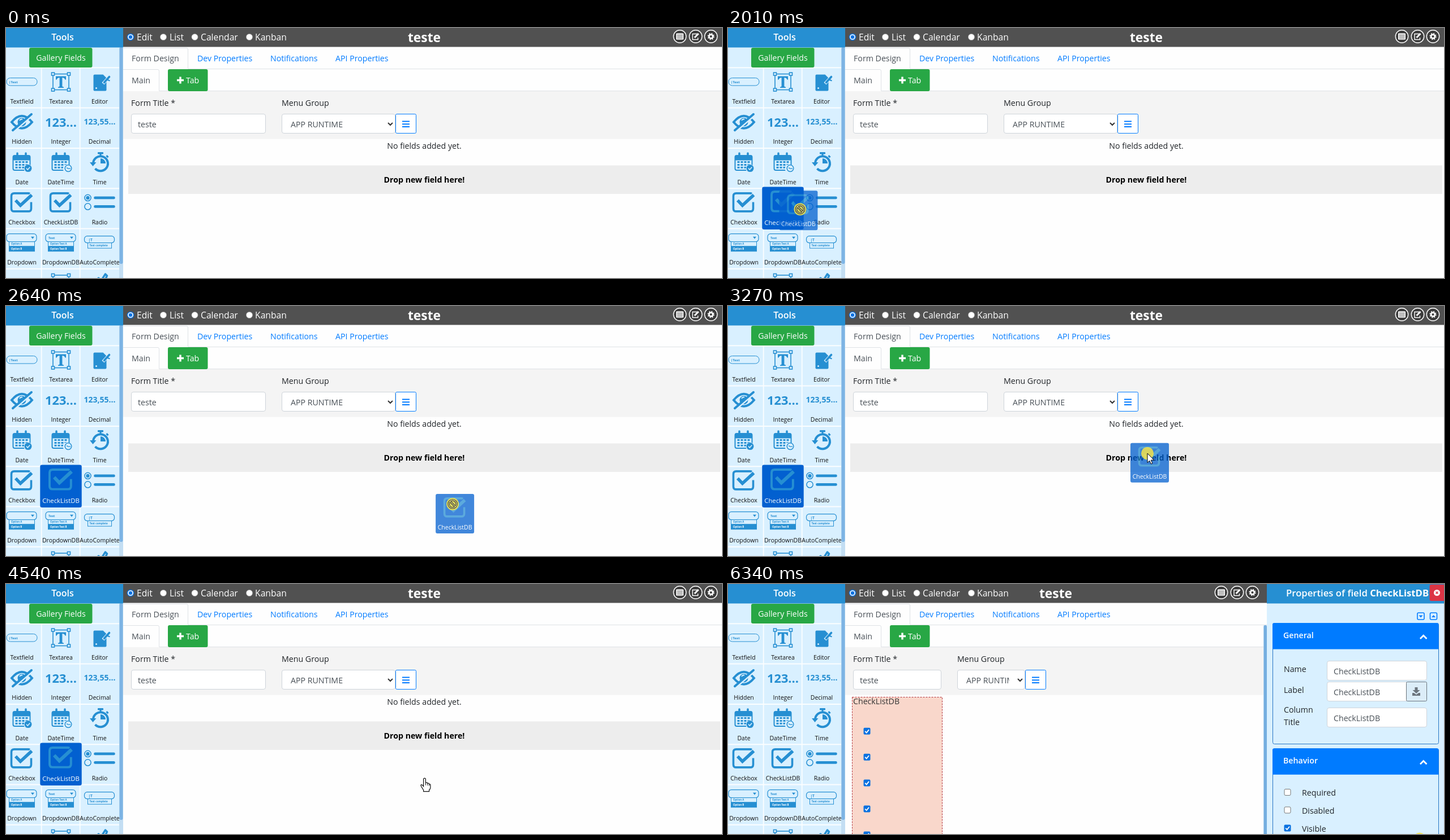
Animation, 1265 px wide and 443 px high, one loop 6.48 s. Source, as an HTML page:

```html
<!DOCTYPE html>
<html lang="en">
<head>
<meta charset="utf-8">
<title>Form designer</title>
<style>
html, body { margin: 0; width: 100%; height: 100%; overflow: hidden; background: #fefefe; }
svg { display: block; }
text { font-family: "Open Sans", "Noto Sans", sans-serif; font-size: 14.2px; fill: #212529; white-space: pre; }
</style>
</head>
<body>
<svg id="stage" width="1265" height="443" viewBox="0 0 1265 443"></svg>
<script>
const LOOP = 6480, BLUE = '#268fd2', LINK = '#007bff', GREEN = '#28a745', PALE = '#d9f0ff', GREY = '#495057';

const text = (x, y, s, fill = '#212529', size = 14.2, more = '') =>
  `<text x="${x}" y="${y}" style="fill:${fill};font-size:${size}px" ${more}>${s}</text>`;
const rect = (x, y, w, h, fill, r = 0, more = '') =>
  `<rect x="${x}" y="${y}" width="${w}" height="${h}" rx="${r}" fill="${fill}" ${more}/>`;
const line = (d, color, w = 1, more = '') =>
  `<path d="${d}" fill="none" stroke="${color}" stroke-width="${w}" ${more}/>`;
const shape = (d, fill, more = '') => `<path d="${d}" fill="${fill}" ${more}/>`;
const dot = (x, y, r, fill, more = '') => `<circle cx="${x}" cy="${y}" r="${r}" fill="${fill}" ${more}/>`;
const group = (x, y, s) => `<g transform="translate(${x} ${y})">${s}</g>`;
const ring = (c, w = 1) => `stroke="${c}" stroke-width="${w}" `;
const MID = 'text-anchor="middle" ', SEMI = 'font-weight="600" ', BOLD = 'font-weight="700" ';
const ROUND = 'stroke-linecap="round" stroke-linejoin="round"';

// Tool icons, drawn around their own centre
const frame = rect(-14, -14, 28, 28, 'none', 0, ring(BLUE, 1.6)) +
  [[-14, -14], [14, -14], [-14, 14], [14, 14]].map(([x, y]) => rect(x - 2.5, y - 2.5, 5, 5, PALE, 0, ring(BLUE, 1.6))).join('');
const calendar = (badge) =>
  rect(-15.5, -12, 30, 26, PALE, 3, ring(BLUE, 2)) + rect(-16, -12.5, 31, 9, BLUE, 2) +
  line('M-8 -16v7M7 -16v7', BLUE, 3.5, ROUND) +
  [0, 1, 2].map(r => line(`M-11.5 ${-0.5 + r * 4.8}H11`, BLUE, 3, 'stroke-dasharray="4 2"')).join('') +
  dot(11, 11, 7.5, PALE) + badge;
const tick = line('M16.5 -1V10.5Q16.5 15.5 11.5 15.5H-13.5Q-18.5 15.5 -18.5 10.5V-11.5Q-18.5 -16.5 -13.5 -16.5H11.5Q13 -16.5 14 -15.8', BLUE, 3.6) +
  line('M-11 -4L-2.5 5L17.5 -13.5', BLUE, 5.6);
const dropdown = (head, a, b) =>
  rect(-27, -16, 53, 14, 'none', 5, ring(BLUE, 1.2)) + shape('M16 -11h6l-3 4z', BLUE) + text(-22, -7, head, BLUE, 5.5, BOLD) +
  rect(-22.5, -2, 45, 17, PALE, 0, ring(BLUE)) + rect(-22.5, 5.5, 45, 9.5, BLUE) +
  text(-19, 3.7, a, BLUE, 4.4, BOLD) + text(-19, 12, b, '#fff', 4.4, BOLD);

const TOOLS = [
  ['Textfield', rect(-27, -7, 54, 13.5, 'none', 6.5, ring(BLUE)) + text(-23, 2, '|Text', BLUE, 6, BOLD)],
  ['Textarea', frame + shape('M-9 -10H9V-4H7.4Q6.5 -7.5 2.4 -7.5V7.5Q2.6 9 5 9V10.5H-5V9Q-2.6 9 -2.4 7.5V-7.5Q-6.5 -7.5 -7.4 -4H-9Z', BLUE)],
  ['Editor', shape('M-9 -13H6L12 -7V14Q12 16 10 16H-9Q-11 16 -11 14V-11Q-11 -13 -9 -13Z', BLUE) +
    line('M6 3L16 -8', PALE, 5.5) + line('M8 1L17 -9', BLUE, 3.6, ROUND) + line('M13 -4l5 2', BLUE, 2) + dot(-6, 11, 1.5, PALE)],
  ['Hidden', line('M-18 0Q0 -22 18 0Q0 22 -18 0Z', BLUE, 4) + dot(0, 0, 7.5, BLUE) + line('M-4 -3q2 -3 5 -2', PALE, 2) +
    line('M-14 16.5L19 -12', PALE, 3) + line('M-16 14.5L17 -14', BLUE, 4, ROUND)],
  ['Integer', text(0, 8, '123...', BLUE, 21.8, BOLD + MID)],
  ['Decimal', text(0, 4.5, '123,55...', BLUE, 14, BOLD + MID)],
  ['Date', calendar(dot(11, 10.5, 6.5, BLUE) + line('M8 10.5l2.3 2.5 4 -4.5', PALE, 1.5))],
  ['DateTime', calendar(dot(13, 10.5, 5.8, PALE, ring(BLUE, 1.5)) + line('M10 9.5l3 1.5 4 0', BLUE, 1.3))],
  ['Time', line('M-11.5 1.5A13 13 0 1 1 -8 11', BLUE, 4) + shape('M-17.5 0H-6L-12 7Z', BLUE) +
    shape('M1.500 2V-7A9 9 0 0 1 10.500 2Z', BLUE) + rect(-3.5, -18, 10, 3.5, BLUE, 1) + line('M1.5 -17v5M12 -12l3 3', BLUE, 3)],
  ['Checkbox', tick],
  ['CheckListDB', tick],
  ['Radio', [-8.5, 7].map(y => dot(-21, y, 5.6, 'none', ring(BLUE, 1.5)) + line(`M-8 ${y}H25`, BLUE, 4.6, ROUND)).join('') + dot(-21, -8.5, 3.2, BLUE)],
  ['Dropdown', dropdown('', 'Option A', 'Option B')],
  ['DropdownDB', dropdown('Text', 'Option Text A', 'Option Text B')],
  ['AutoComplete', rect(-27, -12, 53, 12, 'none', 5, ring(BLUE, 1.2)) + text(-20, -3, '|T', BLUE, 6.5, BOLD) +
    rect(-21, 0, 42, 9.5, PALE, 0, ring(BLUE)) + text(-18, 6.3, 'Text complete', BLUE, 4.6, BOLD)],
  ['', ''],
  ['', frame],
  ['', line('M-9 -2L-2 -9L3 -5L10 -16L13 -13L7 0', BLUE, 3.4, ROUND)]
];

const tileX = i => [28, 97, 165.5][i % 3], tileY = i => 106 + 71.3 * Math.floor(i / 3);
const face = (i, fill) => group(0, -10.5, TOOLS[i][1]) + text(0, 28, TOOLS[i][0], fill, 10.5, MID);
const tile = (i, bg, fill) => rect(-34, -35, 68, 70, bg, 3) + face(i, fill);
const grown = (i, bg, fill, id) =>
  `<g id="${id}" transform="translate(${tileX(i)} ${tileY(i) - .7}) scale(1.08)">${tile(i, bg, fill)}</g>`;

function sidebar() {
  let s = rect(0, 34, 200, 409, PALE);
  for (let r = 0; r < 6; r++) s += line(`M0 ${70.3 + 71.3 * r}H200`, '#fbfeff', 2);
  s += line('M62.7 70V443M130.7 70V443', '#fbfeff', 1.8);
  s += TOOLS.map((_, i) => group(tileX(i), tileY(i), face(i, '#111'))).join('');
  s += grown(11, '#c5e5ff', '#445', 'hoverRadio') + grown(10, '#c5e5ff', '#445', 'hoverList') + grown(10, '#0260d0', '#fff', 'active');
  return s + rect(41, 35, 111.5, 35, GREEN, 3) + text(97, 58, 'Gallery Fields', '#fff', 14.1, MID) +
    rect(200, 34, 7, 409, '#c3def3') + rect(200.5, 34, 6, 384, '#7db4e4', 3) +
    rect(0, 0, 207, 34.5, BLUE) + text(100, 22, 'Tools', '#fff', 16, MID + SEMI);
}

const checkbox = (x, y, on) => on
  ? rect(x - 6, y - 6, 12, 12, '#0b72e0', 2) + line(`M${x - 3.3} ${y}l2.5 2.7 4.3 -5.4`, '#fff', 1.8)
  : rect(x - 5.5, y - 5.5, 11, 11, '#fff', 2, ring('#777'));
const field = (x, y, w) => rect(x + .5, y + .5, w - 1, 34, '#fff', 3.5, ring('#ced4da'));

function topIcons(x) {
  const c = dx => dot(x + dx, 15, 11.2, '#3c3c3c', ring('#fff', 1.4));
  return c(0) + rect(x - 6.5, 9.5, 13, 11, '#fff', 1) + line(`M${x - 5} 12.5h10m-10 2.7h10m-10 2.7h10`, '#3c3c3c', .9) +
    c(28) + line(`M${x + 31} 12v-1.5H${x + 22.5}V20.5H${x + 32}V17`, '#fff', 1.4) + line(`M${x + 26} 17l7 -7`, '#fff', 3) +
    c(55) + dot(x + 55, 15, 3.4, 'none', ring('#fff', 2.6)) + dot(x + 55, 15, 5.2, 'none', ring('#fff', 1.8) + 'stroke-dasharray="2.1 1.984"');
}

// The design area; narrow once the properties panel is open
function main(right, title, inW, selX, selW) {
  const end = selX + selW;
  let s = rect(207, 0, right - 207, 443, '#fefefe') + rect(207, 0, right - 207, 33.5, '#515151');
  [['Edit', 220, 231], ['List', 278, 289], ['Calendar', 333.5, 344], ['Kanban', 430, 440]].forEach(([name, x, tx], i) => {
    s += dot(x, 16, 5.6, '#fff', ring(i ? '#999' : '#0b72e0', i ? .8 : 1.5)) + (i ? '' : dot(x, 16, 3.2, '#0b72e0'));
    s += text(tx, 22, name, '#fff', 15.7);
  });
  s += text(title, 25, 'teste', '#fff', 22.8, MID + BOLD) + topIcons(right === 1265 ? 1190.5 : 871.5);
  s += line(`M207 35.5H319Q321.5 35.5 321.5 38V72.5H${right}`, '#dee2e6') + text(222, 59, 'Form Design', GREY);
  s += text(338, 59, 'Dev Properties', LINK) + text(467, 59, 'Notifications', LINK) + text(582, 59, 'API Properties', LINK);
  s += rect(207, 112, right - 207, 84.5, '#f4f4f4');
  s += line(`M207 73.5H268Q270.5 73.5 270.5 76V111.5H${right}`, '#dee2e6') + text(222, 98, 'Main', GREY);
  s += rect(286, 73, 70.5, 39, GREEN, 3) + line('M302 92.5h12m-6 -6v12', '#fff', 3.4) + text(318, 98, 'Tab', '#fff');
  s += text(221, 138, 'Form Title *') + text(selX, 138, 'Menu Group');
  s += field(221, 152, inW) + text(233, 176, 'teste', GREY) + field(selX, 152, selW);
  s += `<svg x="${selX + 16}" y="152" width="${Math.min(110, selW - 44.5)}" height="35">${text(0, 24, 'APP RUNTIME', GREY)}</svg>`;
  s += line(`M${end - 13} 168l4 4 4 -4`, '#333', 2);
  s += rect(end + .5, 152.5, 36, 34, '#fff', 2, ring(LINK)) + line(`M${end + 12} 165.5h13m-13 4.7h13m-13 4.7h13`, LINK, 2);
  return s;
}

const redBox = (y, rows) => rect(219.5, y, 159, 300, '#f9d7cb', 0, ring('#b2323a') + 'stroke-dasharray="3 2"') +
  rows.map(r => checkbox(245.5, r, true)).join('');
const rowsFrom = y => [0, 1, 2, 3, 4].map(k => y + 45.9 * k);

function editing() {
  const wave = 'M233 221' + 'l2 2l2 -2'.repeat(22);
  return redBox(198, rowsFrom(294.5)) +
    rect(219, 196.5, 160, 61, '#a9c9ee', 4, 'opacity=".6"') +
    rect(220.5, 197.5, 157.5, 57.5, '#fff', 3, ring('#4c94e8', 1.2) + 'stroke-dasharray="3 2"') +
    text(233, 220, 'CheckListDB', '#444', 14.1, BOLD) + line(wave, '#e0333c', .9) +
    line('M319.5 206V223', '#222') + line('M368 252l7 -7m-3 7l3 -3', '#555');
}

function panel() {
  const card = (y, h, name) => rect(962.5, y + .5, 293, h, PALE, 3, ring('#2675c4')) +
    shape(`M962 ${y + 46.5}V${y + 3}q0 -3 3 -3H1252.5q3 0 3 3V${y + 46.5}Z`, LINK) +
    text(981, y + 27, name, '#fff', 14.2, SEMI) + line(`M1223 ${y + 28}l5.7 -5.7 5.7 5.7`, '#fff', 2.8);
  const mini = (x, d) => rect(x - 6, 51, 12, 12, 'none', 2, ring(LINK, 1.6)) + shape(d, LINK);
  let s = rect(952, 0, 313, 443, PALE) + rect(952, 0, 313, 34.5, BLUE);
  s += text(986, 22, 'Properties of field <tspan font-weight="700">CheckListDB</tspan>', '#fff', 16.7, SEMI);
  s += rect(1239.5, 1, 27, 29, '#dc3545', 3) + dot(1252.5, 15.5, 5.5, '#fff') + line('M1250.5 13.5l4 4m0 -4l-4 4', '#dc3545', 1.5);
  s += mini(1224, 'M1220.5 55.5h7l-3.5 4z') + mini(1246.5, 'M1243 59h7l-3.5 -4z');
  s += card(69, 214, 'General') + card(291.3, 200, 'Behavior');
  s += text(982, 156, 'Name') + text(982, 193, 'Label') + text(982, 228, 'Column') + text(982, 250, 'Title');
  for (const y of [136, 173, 219]) s += field(1058, y, 177) + text(1070, y + 24, 'CheckListDB', GREY);
  s += rect(1198.5, 173.5, 36, 34, '#dcedf8', 2, ring('#6c757d')) +
    shape('M1213.5 183h5v5h4l-6.5 6 -6.5 -6h4zM1209 193h3l4 3 4 -3h3v5h-14z', '#6c757d');
  [['Required', 369], ['Disabled', 400.5], ['Visible', 432.5]].forEach(([name, y], i) => {
    s += checkbox(988.5, y, i === 2) + text(1014, y + 6, name);
  });
  return s;
}

const scroll = rect(946, 73, 6, 370, '#d3e8f8') + rect(946.5, 73, 5.5, 380, '#74aee0', 3);
const ARROW = shape('M0 0V16.5L3.8 13L6.3 18.8L8.9 17.7L6.4 12H11.7Z', '#fff', ring('#000'));
const HAND = shape('M-2 1.5Q-2 -.5 0 -.5Q1.8 -.5 1.8 1.5V7.5Q5 6.5 5.3 8.8Q8 8 8.2 10Q10.3 9.7 10.3 12V16Q10 19 8 20.5V23H-2V20.5L-6 14Q-7.5 11 -5.5 11Q-4 11 -2 14Z', '#fff', ring('#111', 1.2)) +
  line('M1.8 8v4M5.3 9v3.5M8.2 10.5v2.5', '#111');
const HALO = dot(0, 0, 11, '#f3e34a', 'opacity=".85"');
const NODROP = dot(0, 0, 7, 'none', ring('#333', 3.4)) + line('M-5 -5L5 5', '#333', 3.4) +
  dot(0, 0, 7, 'none', ring('#f6ec86', 1.2)) + line('M-5 -5L5 5', '#f6ec86', 1.2);

const stage = document.getElementById('stage');
stage.innerHTML =
  `<g id="wide">${main(1265, 739, 238, 487, 201)}${text(739, 214, 'No fields added yet.', '#212529', 14.2, MID)}` +
  `${rect(216, 243.5, 1046, 50.5, '#ededed')}${text(739, 274, 'Drop new field here!', '#000', 14.2, MID + BOLD)}</g>` +
  `<g id="narrow">${main(952, 579, 156, 405, 120)}<g id="edit">${editing()}</g>` +
  `<g id="done">${redBox(200.5, rowsFrom(260.8))}${text(221, 213, 'CheckListDB', '#333')}</g>${scroll}${panel()}</g>` +
  sidebar() +
  `<g id="ghost" opacity=".75">${tile(10, '#0260d0', '#fff')}</g>` +
  `<g id="pointer"><g id="halo">${HALO}</g><g id="nodrop">${NODROP}</g><g id="hand">${HAND}</g><g id="arrow">${ARROW}</g></g>` +
  `<g id="lastHalo">${group(1222, 451.5, HALO)}</g>`;

const el = {};
stage.querySelectorAll('[id]').forEach(n => el[n.id] = n);
const show = (id, on) => el[id].style.display = on ? '' : 'none';
const move = (id, [x, y]) => el[id].setAttribute('transform', `translate(${x.toFixed(1)} ${y.toFixed(1)})`);

// time, x, y
const POINTER = [[330, 1007, 417], [930, 446, 314], [1398, 168, 308], [1600, 100, 318], [1680, 100, 318], [1999, 126, 321],
  [2300, 546, 396], [2600, 789, 351], [2680, 795, 344], [2980, 774, 284], [3410, 725, 250], [4354, 725, 252],
  [4471, 729, 312], [4560, 743, 355], [5005, 799, 406], [5072, 853, 425]];
const GHOST = [[1680, 63, 285], [1999, 89, 288], [2300, 515, 370], [2600, 759, 333], [2680, 765, 326], [2980, 744, 265], [3410, 695, 232]];

function at(keys, t) {
  let i = keys.findIndex(k => k[0] > t);
  if (i < 0) i = keys.length;
  const a = keys[Math.max(0, i - 1)], b = keys[Math.min(i, keys.length - 1)];
  const p = b[0] > a[0] ? (t - a[0]) / (b[0] - a[0]) : 0;
  return [a[1] + (b[1] - a[1]) * p, a[2] + (b[2] - a[2]) * p];
}

function draw(t) {
  // the pointer is sampled about fifteen times a second
  const q = 330 + Math.floor((t - 330) / 66.8) * 66.8;
  const pos = at(POINTER, Math.max(330, q));
  const drag = t >= 1680 && t < 4080, opened = t >= 4750;
  const blocked = drag && pos[1] > 294;
  const overTools = t >= 330 && t < 1680 && pos[0] < 200;
  const hand = overTools || (t >= 4080 && !opened);

  show('wide', !opened);
  show('narrow', opened);
  show('edit', t < 6270);
  show('done', t >= 6270);
  show('hoverRadio', overTools && pos[0] > 131);
  show('hoverList', overTools && pos[0] <= 131);
  show('active', t >= 1680 && !opened);

  show('ghost', drag);
  const [gx, gy] = at(GHOST, Math.max(1680, q));
  move('ghost', [gx + 34, gy + 35]);

  show('pointer', t >= 330 && t < 5150);
  move('pointer', pos);
  show('halo', drag);
  show('nodrop', blocked);
  show('hand', hand);
  show('arrow', !hand && !blocked);
  show('lastHalo', t >= 6340);
}

const start = performance.now();
function loop(now) {
  draw(Math.max(0, now - start) % LOOP);
  requestAnimationFrame(loop);
}
draw(0);
requestAnimationFrame(loop);
</script>
</body>
</html>
```
